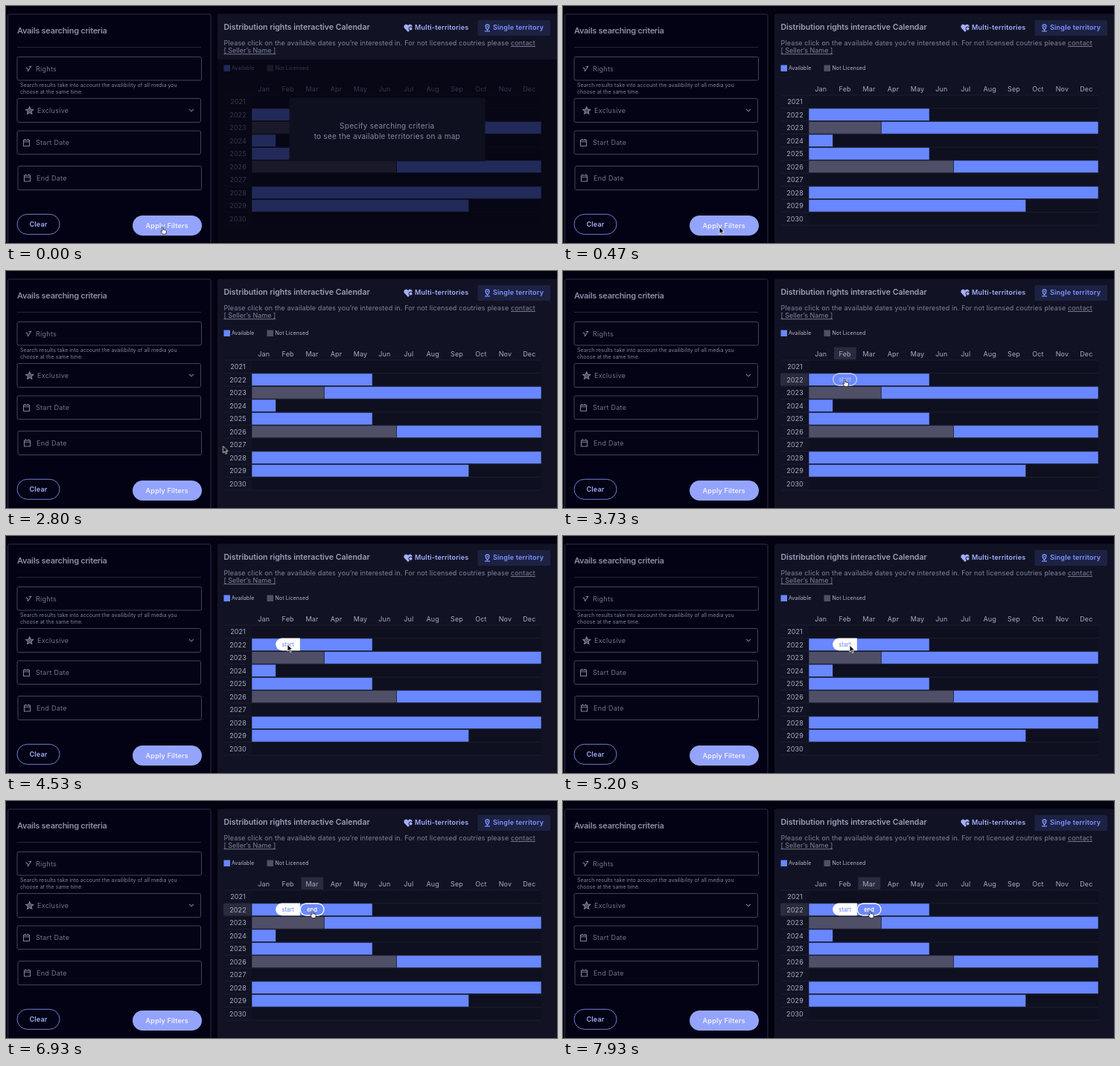
These frames come from a looping animation (740x319 px, 8 s). An HTML page:

```html
<!DOCTYPE html>
<html lang="en">
<head>
<meta charset="utf-8">
<title>Availability calendar</title>
<style>
  html, body { margin: 0; width: 100%; height: 100%; overflow: hidden; background: #020211; }
  svg { display: block; width: 740px; height: 319px; font: 9px Inter, "Open Sans", sans-serif; }
  .field { fill: #030315; stroke: #424556; }
  .label { fill: #72768d; letter-spacing: .28px; }
  .icon { fill: none; stroke: #7d819a; stroke-width: 1.1; }
  .note { font-size: 7px; fill: #82859a; letter-spacing: .05px; }
  .para { fill: #7f839b; letter-spacing: .14px; }
  .strong { font-weight: 600; letter-spacing: .2px; }
  .legend { font-size: 7px; fill: #b4b7ca; letter-spacing: .1px; }
  .mid { text-anchor: middle; }
  .axis { fill: #a8abbf; letter-spacing: .1px; }
  .pill { font-size: 7.5px; text-anchor: middle; }
  .hint { font-size: 10px; fill: #8689a0; letter-spacing: .25px; text-anchor: middle; }
</style>
</head>
<body>
<svg viewBox="0 0 740 319">
  <g id="filters">
    <rect x="2.5" y="11" width="272.5" height="320" rx="2" fill="#020214" stroke="#2c2e3f"/>
    <text x="15" y="36.5" font-size="11" font-weight="600" letter-spacing="-.28" fill="#8b8ea6">Avails searching criteria</text>
    <path d="M15 55.500H262" stroke="#232538"/>
    <rect class="field" x="15" y="68.500" width="247.500" height="31.500" rx="2"/>
    <rect class="field" x="15" y="124.500" width="246.500" height="32" rx="2"/>
    <rect class="field" x="15" y="168" width="246.500" height="31.500" rx="2"/>
    <rect class="field" x="16" y="215.500" width="246.500" height="32" rx="2"/>
    <path class="icon" d="M26.500 83l2.200 1 .8 3.500 4.500-6.500m-3.500.8l3.500-.8"/>
    <path class="icon" style="fill: #4a4d66" d="M31.700 135.800l1.500 3.200 3.500.4-2.600 2.400.7 3.500-3.100-1.700-3.100 1.700.7-3.500-2.600-2.400 3.500-.4z"/>
    <path class="icon" d="M246 138.800l3 3 3-3"/>
    <path id="calendar" class="icon" d="M23.500 180.500h8v8h-8zm0 2.200h8m-6-4v2m4-2v2"/>
    <use href="#calendar" x="1" y="47.500"/>
    <text class="label" x="40" y="87.500">Rights</text>
    <text class="label" x="42" y="144">Exclusive</text>
    <text class="label" x="40" y="187.300">Start Date</text>
    <text class="label" x="41" y="235">End Date</text>
    <text class="note" x="19" y="108.500">Search results take into account the availibility of all media you</text>
    <text class="note" x="19" y="117.500">choose at the same time.</text>
    <rect x="15" y="280.300" width="57" height="27" rx="13.500" fill="#030315" stroke="#6f7fd2"/>
    <text class="strong mid" x="43.500" y="297.300" fill="#a3b0fa">Clear</text>
    <rect x="170" y="282" width="93" height="27" rx="13.500" fill="#94a4fd"/>
    <text class="strong mid" x="216.300" y="299" fill="#eef0ff">Apply Filters</text>
  </g>

  <rect x="284" y="10.500" width="460" height="320" rx="2" fill="#111324"/>
  <g id="heading">
    <text x="292.500" y="32.300" font-size="10.500" font-weight="600" fill="#9ca0b8">Distribution rights interactive Calendar</text>
    <text class="para" x="292.500" y="53">Please click on the available dates you’re interested in. For not licensed coutries please <tspan text-decoration="underline">contact</tspan></text>
    <text class="para" x="292.500" y="63.300" text-decoration="underline" style="letter-spacing: 0">[ Seller’s Name ]</text>
    <path d="M540 35l-5-5.200c-2.200-3.300 2-7 5-3.600 3-3.400 7.200.3 5 3.600z" fill="#a3b0ff"/>
    <circle cx="543.500" cy="30.500" r="2.500" fill="#a3b0ff" stroke="#111324"/>
    <text class="strong" x="549" y="32.300" fill="#a3b0ff">Multi-territories</text>
    <rect x="633.500" y="19" width="97.500" height="21" rx="1.500" fill="#1d2243"/>
    <path d="M646.500 32.200c-3.600-4-3-7.200 0-7.200s3.600 3.200 0 7.200zm-3.500 1.600h7" fill="none" stroke="#7f95ff" stroke-width="1.300"/>
    <circle cx="646.500" cy="27.800" r="1" fill="#7f95ff"/>
    <text class="strong" x="654" y="32.300" fill="#7f95ff">Single territory</text>
  </g>

  <rect x="292.500" y="79.500" width="8.500" height="8.500" fill="#6987ff"/>
  <text class="legend" x="303" y="86.300">Available</text>
  <rect x="350.500" y="79.500" width="8.500" height="8.500" fill="#4f4f67"/>
  <text class="legend" x="361.500" y="86.300">Not Licensed</text>
  <g id="chart"></g>

  <g id="veil">
    <rect x="284" y="72" width="460" height="250" fill="#030412" opacity=".7"/>
    <rect x="380.500" y="123.500" width="263" height="85.500" rx="1.500" fill="#0e1020"/>
    <text class="hint" x="511.800" y="164.500">Specify searching criteria</text>
    <text class="hint" x="511.800" y="178.500">to see the available territories on a map</text>
  </g>

  <g id="cursor">
    <path id="arrow" d="M0 0v9.200l2.200-2 1.500 3.300 1.500-.7-1.500-3.200h3z" fill="#08080c" stroke="#fff" stroke-width=".8"/>
    <path id="hand" d="M-.2.600c0-1 1.600-1 1.600 0v3l2.900.6c.9.200 1.200.8 1.100 1.600l-.6 3.800h-4.200l-2.500-3.400c-.4-.9.600-1.500 1.700-.4z" fill="#fff" stroke="#15151c" stroke-width=".8"/>
  </g>
</svg>
<script>
const LOOP = 8000;
const LEFT = 330, COL = 389 / 12, TOP = 120, ROW = 17.5;
const BLUE = '#6987ff', GREY = '#4f4f67';
const MONTHS = 'Jan Feb Mar Apr May Jun Jul Aug Sep Oct Nov Dec'.split(' ');
// year: [first month, end month, colour]
const SPANS = {
  2022: [[0, 5, BLUE]],
  2023: [[0, 3, GREY], [3, 12, BLUE]],
  2024: [[0, 1, BLUE]],
  2025: [[0, 5, BLUE]],
  2026: [[0, 6, GREY], [6, 12, BLUE]],
  2028: [[0, 12, BLUE]],
  2029: [[0, 9, BLUE]]
};

const $ = id => document.getElementById(id);
const chart = $('chart');

function add(parent, tag, attrs, text = '') {
  const el = document.createElementNS('http://www.w3.org/2000/svg', tag);
  for (const key in attrs) el.setAttribute(key, attrs[key]);
  el.textContent = text;
  parent.append(el);
  return el;
}

const group = () => add(chart, 'g', {});
const colX = month => LEFT + month * COL;
const rowY = year => TOP + (year - 2021) * ROW;

// Hover marks lie under the axis labels.
function headerMark(month) {
  const g = group();
  const box = { fill: '#292b3f', rx: 1 };
  add(g, 'rect', { ...box, x: colX(month) + 1.5, y: 102.5, width: COL - 2.5, height: 16.5 });
  add(g, 'rect', { ...box, x: 292, y: rowY(2022) + .5, width: 37.5, height: 16.5 });
  return g;
}

const febMark = headerMark(1), marMark = headerMark(2);

MONTHS.forEach((name, i) =>
  add(chart, 'text', { class: 'axis mid', x: colX(i + .5), y: 114.5 }, name));

function rowLine(year) {
  add(chart, 'path', { d: `M293 ${rowY(year)}H719`, stroke: '#1f2132', 'stroke-width': .8 });
}

for (let year = 2021; year <= 2030; year++) {
  const y = rowY(year);
  add(chart, 'rect', { x: LEFT, y: y + .5, width: 389, height: ROW - 1, fill: '#0e101f' });
  rowLine(year);
  add(chart, 'text', { class: 'axis mid', x: 311.5, y: y + 12 }, year);
  for (const [from, to, fill] of SPANS[year] || [])
    add(chart, 'rect', {
      x: colX(from), y: y + .4, width: (to - from) * COL, height: ROW - .8,
      fill, stroke: '#111324', 'stroke-width': .6
    });
}
rowLine(2031);

function pill(month, label, stroke, weight) {
  const g = group();
  add(g, 'rect', { x: colX(month) + .3, y: 138, width: COL - .6, height: 16, rx: 8, fill: '#6d89ff', stroke, 'stroke-width': 1.3 });
  add(g, 'text', { class: 'pill', x: colX(month + .5), y: 148.5, fill: stroke, 'font-weight': weight }, label);
  return g;
}

const startHover = pill(1, 'start', '#c3ceff', 400);
const startSet = group();
add(startSet, 'path', { d: `M${colX(2)} 137.500H${colX(1) + 8.2}a8.400 8.400 0 0 0 0 16.800H${colX(2)}z`, fill: '#fff' });
add(startSet, 'text', { class: 'pill', x: colX(1.5), y: 148.5, fill: '#5f7ff0' }, 'start');
const endHover = pill(2, 'end', '#fff', 600);

function play(el, frames) {
  el.animate(frames, { duration: LOOP, iterations: Infinity });
}

function fade(el, steps) {
  play(el, steps.map(([t, opacity]) => ({ offset: t / LOOP, opacity })));
}

// Visible from one time to another, with an optional ramp at the start.
function show(el, from, to, ramp = 0) {
  const steps = [[0, 0], [from, 0], [from + ramp, 1], [to, 1]];
  if (to < LOOP) steps.push([to, 0], [LOOP, 0]);
  fade(el, steps);
}

fade($('veil'), [[0, 1], [100, 1], [400, 0], [LOOP, 0]]);
show(febMark, 3400, 4300, 120);
show(startHover, 3400, 4300, 200);
show(startSet, 4300, LOOP, 150);
show(marMark, 5500, LOOP, 120);
show(endHover, 5500, LOOP, 200);
fade($('hand'), [[0, 1], [250, 1], [250, 0], [3400, 0], [3400, 1], [4300, 1], [4300, 0], [5500, 0], [5500, 1], [LOOP, 1]]);
fade($('arrow'), [[0, 0], [250, 0], [250, 1], [3400, 1], [3400, 0], [4300, 0], [4300, 1], [5500, 1], [5500, 0], [LOOP, 0]]);

// time, x, y of the pointer tip
const PATH = [
  [0, 210, 297.5], [1000, 210, 297.5], [1800, 283.7, 243.7], [2600, 283.7, 243.7],
  [3600, 378, 146], [4500, 378, 146], [5000, 385, 147], [5200, 385, 147],
  [5750, 410, 148], [6600, 410, 148], [7400, 412, 148], [LOOP, 412, 148]
];
play($('cursor'), PATH.map(([t, x, y]) => ({
  offset: t / LOOP, transform: `translate(${x}px, ${y}px)`, easing: 'ease-in-out'
})));
</script>
</body>
</html>
```
